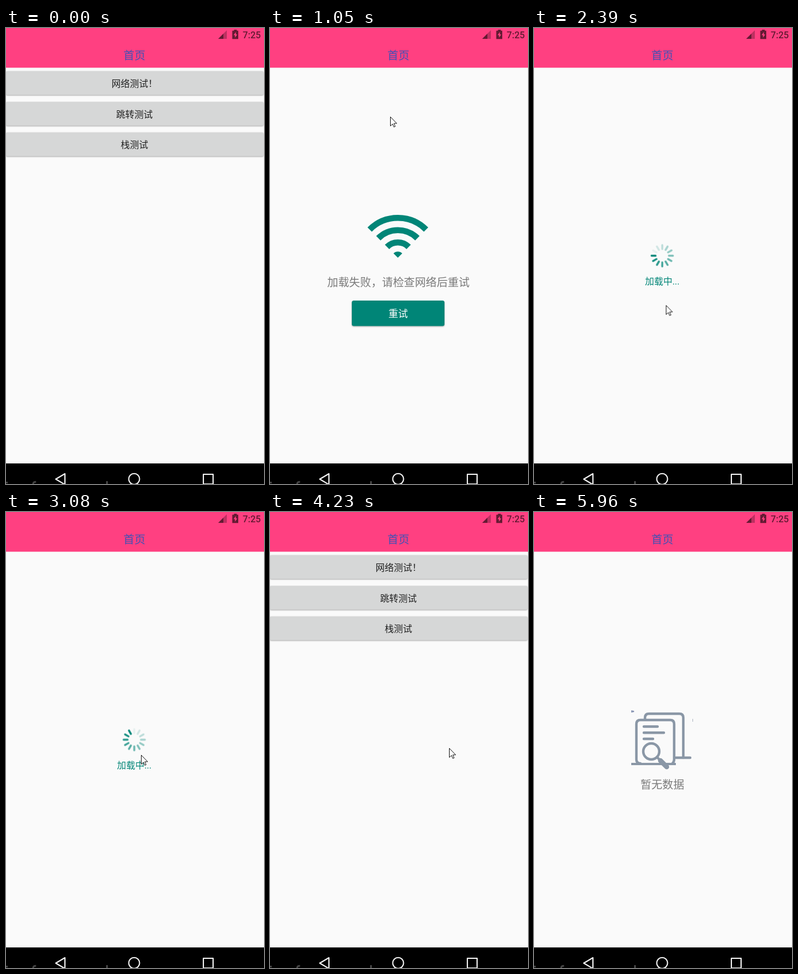
Write an HTML page that moves like this. It is 451 px wide and 798 px high and loops after 6570 ms.

```html
<!DOCTYPE html>
<html lang="zh-CN">
<head>
<meta charset="utf-8">
<title>首页</title>
<style>
html, body { margin: 0; width: 100%; height: 100%; overflow: hidden; background: #fafafa; }
svg { display: block; width: 451px; height: 798px; }
text { font-family: Roboto, "Noto Sans CJK SC", "Noto Sans CJK", sans-serif; text-anchor: middle; }
.t16 { font-size: 15.96px; }
.t19 { font-size: 19.15px; }
.line { fill: none; stroke-linecap: round; stroke-linejoin: round; }
.shade { filter: drop-shadow(0 1px 1px rgba(0, 0, 0, .34)); }

.screen { visibility: hidden; animation: 6570ms step-end infinite; }
#list { animation-name: list; }
#fail { animation-name: fail; }
#load { animation-name: load; }
#empty { animation-name: empty; }
#spin { animation: spin 6570ms infinite; }
#cursor { animation: cursor 6570ms infinite; }

@keyframes list {
  0%, 64.383% { visibility: visible; }
  15.98%, 82.496%, 100% { visibility: hidden; }
}
@keyframes fail {
  0%, 32.876%, 100% { visibility: hidden; }
  15.98% { visibility: visible; }
}
@keyframes load {
  0%, 64.383%, 100% { visibility: hidden; }
  32.876% { visibility: visible; }
}
@keyframes empty {
  0% { visibility: hidden; }
  82.496%, 100% { visibility: visible; }
}
@keyframes spin {
  0%, 32.116% { transform: rotate(-570deg); animation-timing-function: steps(43); }
  64.84%, 100% { transform: rotate(720deg); }
}
/* the pointer moves in jumps of about 77 ms */
@keyframes cursor {
  0% { transform: translate(381px, 800px); animation-timing-function: step-end; }
  1.826% { transform: translate(381px, 742px); animation-timing-function: steps(4); }
  6.545% { transform: translate(276px, 388px); animation-timing-function: steps(4); }
  11.263% { transform: translate(210px, 155px); animation-timing-function: step-end; }
  15.981% { transform: translate(210px, 155px); animation-timing-function: steps(4); }
  20.776% { transform: translate(240px, 330px); animation-timing-function: steps(4); }
  25.57% { transform: translate(263px, 482px); animation-timing-function: steps(4); }
  30.289% { transform: translate(226px, 494.5px); animation-timing-function: step-end; }
  32.876% { transform: translate(226px, 494.5px); animation-timing-function: steps(8); }
  42.161% { transform: translate(238px, 469px); animation-timing-function: steps(4); }
  46.879% { transform: translate(236px, 425px); animation-timing-function: steps(6); }
  53.881% { transform: translate(239px, 426px); animation-timing-function: steps(9); }
  64.383% { transform: translate(313px, 413px); animation-timing-function: steps(2); }
  66.971% { transform: translate(323px, 411px); animation-timing-function: step-end; }
  68.036% { transform: translate(323px, 411px); animation-timing-function: steps(9); }
  78.995% { transform: translate(222px, 94px); animation-timing-function: step-end; }
  82.496% { transform: translate(222px, 94px); animation-timing-function: steps(7); }
  90.715%, 100% { transform: translate(340px, 880px); }
}
</style>
</head>
<body>
<svg viewBox="0 0 451 798">
  <rect width="451" height="798" fill="#fafafa"/>

  <g id="header">
    <rect width="451" height="69.5" fill="#ff4081"/>
    <path d="M371 19 L386 4 V19Z" fill="#bd3061"/>
    <path d="M371 19 L380 10 V19Z" fill="#641a33"/>
    <path d="M398.5 3 H403.5 V4.7 H406 V19.3 H395.5 V4.7 H398.5Z" fill="#641a33"/>
    <path d="M401.8 7 L397.8 12.6 H400.3 V17 L404.2 11.2 H401.8Z" fill="#ff4081"/>
    <text x="429.6" y="17.7" font-size="16" font-weight="500" fill="#641a33">7:25</text>
    <text class="t19" x="224.5" y="54.6" fill="#3f51b5">首页</text>
  </g>

  <g id="list" class="screen">
    <g class="shade" fill="#d6d7d7">
      <rect y="75.5" width="450" height="41.5" rx="2"/>
      <rect y="129.2" width="450" height="41.5" rx="2"/>
      <rect y="182.8" width="450" height="41.5" rx="2"/>
    </g>
    <g class="t16" fill="#202020">
      <text x="224.5" y="103">网络测试！</text>
      <text x="224.5" y="156.6">跳转测试</text>
      <text x="224.5" y="210.2">栈测试</text>
    </g>
  </g>

  <g id="fail" class="screen">
    <g fill="none" stroke="#008577" stroke-width="10.7">
      <path d="M174.2 352.7 A69.7 69.7 0 0 1 272.8 352.7"/>
      <path d="M189.4 367.9 A48.2 48.2 0 0 1 257.6 367.9"/>
      <path d="M204.6 383.1 A26.7 26.7 0 0 1 242.4 383.1"/>
    </g>
    <path d="M223.5 402 L215.9 394.4 A10.8 10.8 0 0 1 231.1 394.4Z" fill="#008577"/>
    <text class="t19" x="224.5" y="451.7" fill="#7a7a7a">加载失败，请检查网络后重试</text>
    <rect class="shade" x="143" y="477" width="162" height="44.5" rx="3.5" fill="#008577"/>
    <text x="224" y="505.5" font-size="17" fill="#fff">重试</text>
  </g>

  <g id="load" class="screen">
    <g transform="translate(224.2 398.5)"><g id="spin" class="line" stroke="#008577" stroke-width="3.4"></g></g>
    <text class="t16" x="224.3" y="449" fill="#008577">加载中...</text>
  </g>

  <g id="empty" class="screen">
    <g class="line" stroke="#8a97a6" stroke-width="4.4">
      <path d="M194 362 V360 Q194 353 201 353 H254 Q261 353 261 360 V430"/>
      <path d="M248 430 H273"/>
      <path d="M186 440 Q179 440 179 433 V371 Q179 364 186 364 H238 Q245 364 245 371 V433 Q245 437 242 440"/>
      <path d="M192 375.5 H216 M192 386.3 H227 M192 397 H208"/>
      <circle cx="205" cy="419" r="14"/>
      <path d="M215 429 L220 434"/>
      <path d="M221 435 L232 446" stroke-width="8.5"/>
    </g>
    <path d="M170 439 H248 V443 H170Z" fill="#8a97a6"/>
    <path d="M170 347 L175 348 V350 L170 351Z" fill="#8996b4"/>
    <path d="M277.5 362 V367" stroke="#a9b2bd"/>
    <text class="t19" x="224.3" y="483.7" fill="#7a7a7a">暂无数据</text>
  </g>

  <g id="navbar">
    <rect y="762" width="451" height="36" fill="#000"/>
    <path d="M0 795.5 H3 M47.5 798 Q47.5 794 52.5 794.2 M176.5 793 V798" fill="none" stroke="#454545" stroke-width="3"/>
    <g class="line" stroke="#f4f4f4" stroke-width="2.1">
      <path d="M103 780 L87 789.5 L103 799Z"/>
      <circle cx="224" cy="789.3" r="9.5"/>
      <rect x="345" y="781" width="17" height="17"/>
    </g>
  </g>

  <g id="cursor">
    <path d="M.5 .5 V16.5 L4.3 13 L6.6 18.3 L8.9 17.3 L6.6 12 H11.6Z" fill="#fff" stroke="#111"/>
  </g>
</svg>
<script>
const spin = document.getElementById('spin');
for (let i = 0; i < 12; i++) {
  const spoke = document.createElementNS(spin.namespaceURI, 'path');
  spoke.setAttribute('d', 'M0 -18.6 V-11.7');
  spoke.setAttribute('transform', `rotate(${i * 30})`);
  spoke.setAttribute('opacity', (i + 1) / 12);
  spin.append(spoke);
}
</script>
</body>
</html>
```
